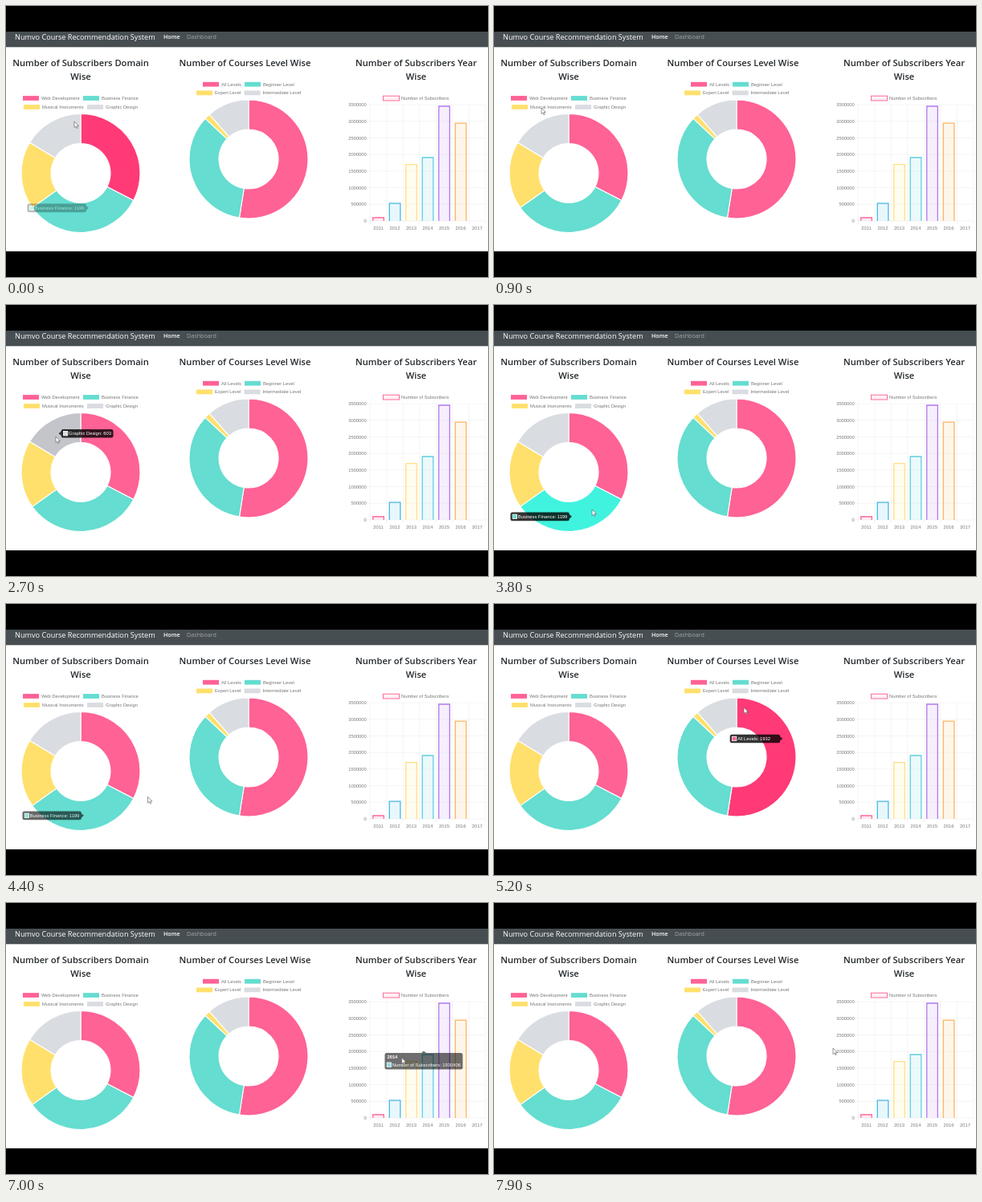
An HTML page for the animation above (8 s loop, 600x338 px).

```html
<!DOCTYPE html>
<html lang="en">
<head>
<meta charset="utf-8">
<title>Course dashboard</title>
<style>
html, body { margin: 0; width: 100%; height: 100%; overflow: hidden; background: #000; }
svg { display: block; width: 600px; height: 338px; }
.ui { font-family: "Open Sans", "Noto Sans", sans-serif; }
.head { font-size: 11.2px; font-weight: 600; fill: #24292d; text-anchor: middle; }
.chart { font: 5.8px "Liberation Sans", Arial, sans-serif; fill: #777; }
#tip text { fill: #fff; }
</style>
</head>
<body>
<svg id="stage" viewBox="0 0 600 338" xmlns="http://www.w3.org/2000/svg"></svg>
<script>
const LOOP = 8000;
const stage = document.getElementById('stage');

function add(parent, tag, attrs, text) {
  const el = document.createElementNS('http://www.w3.org/2000/svg', tag);
  set(el, attrs);
  if (text !== undefined) el.textContent = text;
  parent.appendChild(el);
  return el;
}
function set(el, attrs) {
  for (const k in attrs) el.setAttribute(k, attrs[k]);
}
const clamp = v => Math.max(0, Math.min(1, v));
const mix = (a, b, k) => a + (b - a) * k;

// Page
add(stage, 'rect', { width: 600, height: 338, fill: '#000' });
add(stage, 'rect', { y: 32, width: 600, height: 274, fill: '#fff' });
add(stage, 'rect', { y: 32, width: 600, height: 19.3, fill: '#464e52' });
const ui = add(stage, 'g', { class: 'ui' });
add(ui, 'text', { x: 11, y: 42, 'font-size': 9.14, fill: '#fff' }, 'Numvo Course Recommendation System');
add(ui, 'text', { x: 196, y: 41.3, 'font-size': 7.1, 'font-weight': 600, fill: '#fff' }, 'Home');
add(ui, 'text', { x: 225, y: 41.3, 'font-size': 7.2, fill: '#a2a7a9' }, 'Dashboard');
[
  [93, 74.6, 'Number of Subscribers Domain'], [93, 92, 'Wise'],
  [297.5, 74.6, 'Number of Courses Level Wise'],
  [510.5, 74.6, 'Number of Subscribers Year'], [510.5, 92, 'Wise']
].forEach(([x, y, s]) => add(ui, 'text', { x, y, class: 'head' }, s));

const charts = add(stage, 'g', { class: 'chart' });

// Doughnuts
const PINK = ['#ff6295', '#ff3a76'], TEAL = ['#65ddd0', '#40f3df'];
const YELLOW = ['#ffe06c', '#ffd43a'], GREY = ['#d9dce1', '#c3c5cb'];

function ring(cx, cy, slices) {
  const R = 74, r = 37;
  const total = slices.reduce((sum, s) => sum + s.value, 0);
  const at = (a, d) => (cx + d * Math.sin(a)).toFixed(2) + ' ' + (cy - d * Math.cos(a)).toFixed(2);
  let a = 0;
  for (const s of slices) {
    const b = a + s.value / total * 2 * Math.PI, m = (a + b) / 2;
    const big = b - a > Math.PI ? 1 : 0;
    s.el = add(charts, 'path', {
      d: `M${at(a, R)}A${R} ${R} 0 ${big} 1 ${at(b, R)}L${at(b, r)}A${r} ${r} 0 ${big} 0 ${at(a, r)}Z`,
      stroke: '#fff', 'stroke-width': 1.1, fill: s.color[0]
    });
    s.x = cx + (R + r) / 2 * Math.sin(m);
    s.y = cy - (R + r) / 2 * Math.cos(m);
    s.side = s.x < cx ? 'left' : 'right';
    s.label = s.name + ': ' + s.value;
    s.paint = on => set(s.el, { fill: s.color[on ? 1 : 0] });
    add(charts, 'rect', { x: s.lx, y: s.ly - 2.9, width: 20, height: 5.8, fill: s.color[0] });
    add(charts, 'text', { x: s.lx + 23, y: s.ly + 2 }, s.name);
    a = b;
  }
  return slices;
}
const slice = (name, value, color, lx, ly) => ({ name, value, color, lx, ly });

const domains = ring(93, 208.5, [
  slice('Web Development', 1200, PINK, 21, 115),
  slice('Business Finance', 1199, TEAL, 96, 115),
  slice('Musical Instruments', 680, YELLOW, 22, 126),
  slice('Graphic Design', 603, GREY, 101, 126)
]);
domains[1].side = 'right';
const levels = ring(302, 191, [
  slice('All Levels', 1932, PINK, 245, 97.7),
  slice('Beginner Level', 1270, TEAL, 297, 97.7),
  slice('Expert Level', 58, YELLOW, 237, 108.4),
  slice('Intermediate Level', 421, GREY, 296.5, 108.4)
]);

// Bars
const BASE = 268, STEP = 20.7, COL = 20.5, LEFT = 453.3;
const line = (x1, y1, x2, y2) =>
  add(charts, 'line', { x1, y1, x2, y2, stroke: '#000', 'stroke-opacity': .07, 'stroke-width': .6 });
for (let i = 0; i < 8; i++) {
  const y = BASE - i * STEP;
  line(LEFT - 4, y, LEFT + 7 * COL, y);
  line(LEFT + i * COL, BASE - 7 * STEP, LEFT + i * COL, BASE + 4);
  add(charts, 'text', { x: 448.8, y: y + 2, 'text-anchor': 'end' }, i * 500000);
}
add(charts, 'rect', { x: 469.5, y: 112.2, width: 20, height: 5.8, fill: '#fff0f4', stroke: '#ff6b96', 'stroke-width': 1 });
add(charts, 'text', { x: 492, y: 117 }, 'Number of Subscribers');

const bars = [
  [264, '#fb6a9a'], [246.2, '#45b9e2'], [197.6, '#ffe183'], [189, '#5dcfde'],
  [125, '#b07bee'], [146.2, '#fdb35e'], [BASE, 'none']
].map(([top, color], i) => {
  const mid = LEFT + (i + .5) * COL, l = mid - 6.8, r = mid + 6.8;
  const el = add(charts, 'path', {
    d: `M${l} ${BASE}V${top}H${r}V${BASE}`, fill: color, 'fill-opacity': .12,
    stroke: color, 'stroke-width': 1.3
  });
  add(charts, 'text', { x: mid, y: 278.6, 'text-anchor': 'middle' }, 2011 + i);
  return {
    el, color: [color, color], x: 520, y: 184.5, side: 'top',
    title: String(2011 + i), label: 'Number of Subscribers: 1930406',
    paint: on => set(el, { 'fill-opacity': on ? .25 : .12, 'stroke-width': on ? 1.5 : 1.3 })
  };
});

// Tooltip
const tip = add(stage, 'g', { id: 'tip', class: 'chart' });
const tipBox = add(tip, 'rect', { rx: 2.5, fill: '#000', 'fill-opacity': .8 });
const tipCaret = add(tip, 'path', { fill: '#000', 'fill-opacity': .8 });
const tipKey = add(tip, 'rect', { width: 5.4, height: 5.4, stroke: '#fff', 'stroke-width': .8 });
const tipTitle = add(tip, 'text', { 'font-weight': 'bold' });
const tipText = add(tip, 'text', {});

// [from, to, group, item, dx, dy]
const hovers = [
  [-700, -230, domains, 1, 6, -12],
  [-230, 100, domains, 0],
  [100, 380, domains, 3],
  [1720, 2930, domains, 3],
  [2930, 3370, domains, 2],
  [3370, 4310, domains, 1],
  [4535, 4880, levels, 1],
  [4880, 4915, levels, 2],
  [4915, 5135, levels, 3],
  [5135, 5960, levels, 0],
  [6300, 6900, bars, 3]
].map(([from, to, group, i, dx = 0, dy = 0]) => ({ from, to, group, item: group[i], dx, dy }));
hovers[1].quiet = hovers[2].quiet = true;

for (const h of hovers) {
  const s = h.item;
  tipText.textContent = s.label;
  const w = tipText.getComputedTextLength() + 12;
  const tall = s.side === 'top';
  const x = tall ? s.x - w / 2 : s.side === 'left' ? s.x + 3 : s.x - 3 - w;
  h.box = { x: x + h.dx, y: (tall ? s.y + 2.6 : s.y - 5.3) + h.dy, w, h: tall ? 20.5 : 10.6 };
}

function drawTip(t) {
  const shown = hovers.filter(h => !h.quiet && t >= h.from);
  const h = shown[shown.length - 1], prev = shown[shown.length - 2];
  const out = clamp(1 - (t - h.to) / 350);
  const joined = prev && prev.to === h.from && prev.group === h.group;
  const alpha = Math.min(joined ? 1 : clamp((t - h.from) / 150), out);
  set(tip, { opacity: alpha });
  if (!alpha) return;
  const k = joined ? 1 - Math.pow(1 - clamp((t - h.from) / 400), 4) : 1;
  const b = {};
  for (const p in h.box) b[p] = joined ? mix(prev.box[p], h.box[p], k) : h.box[p];
  const s = h.item, cy = b.y + b.h / 2, right = b.x + b.w;
  const row = s.title ? b.y + 14.6 : cy;
  set(tipBox, { x: b.x, y: b.y, width: b.w, height: b.h });
  set(tipCaret, {
    d: s.side === 'top' ? `M${b.x + b.w / 2 - 3} ${b.y}l3 -2.6l3 2.6Z`
      : s.side === 'left' ? `M${b.x} ${cy - 2.6}l-3 2.6l3 2.6Z`
      : `M${right} ${cy - 2.6}l3 2.6l-3 2.6Z`
  });
  set(tipKey, { x: b.x + 2.7, y: row - 2.7, fill: s.color[0] });
  set(tipText, { x: b.x + 9.4, y: row + 2 });
  set(tipTitle, { x: b.x + 3, y: b.y + 7.2 });
  tipText.textContent = s.label;
  tipTitle.textContent = s.title || '';
}

// Pointer
const pointer = add(stage, 'path', {
  d: 'M0 0V7.6L1.8 6L3 8.7L4.2 8.1L3 5.6H5.4Z', fill: '#fff', stroke: '#555', 'stroke-width': .6
});
const path = [
  [0, 85, 144], [450, 64, 130], [900, 59, 127], [1300, 59, 128], [1900, 61, 150],
  [2700, 62, 164], [3150, 47, 205], [3550, 110, 250], [3800, 122, 255], [4250, 128, 256],
  [4600, 250, 217], [4950, 268, 148], [5200, 311, 129], [5750, 330, 160],
  [6400, 519, 196], [6750, 522, 198], [7450, 422, 181], [LOOP, 422, 181]
];
function pointerAt(t) {
  const i = path.findIndex(p => p[0] > t), a = path[i - 1], b = path[i];
  const u = (t - a[0]) / (b[0] - a[0]), k = u * u * (3 - 2 * u);
  return [mix(a[1], b[1], k), mix(a[2], b[2], k)];
}

function draw(t) {
  const live = hovers.find(h => t >= h.from && t < h.to);
  for (const s of [...domains, ...levels, ...bars]) s.paint(live && live.item === s);
  drawTip(t);
  set(pointer, { transform: `translate(${pointerAt(t)})` });
}

const start = performance.now();
function frame() {
  draw((performance.now() - start) % LOOP);
  requestAnimationFrame(frame);
}
frame();
</script>
</body>
</html>
```
